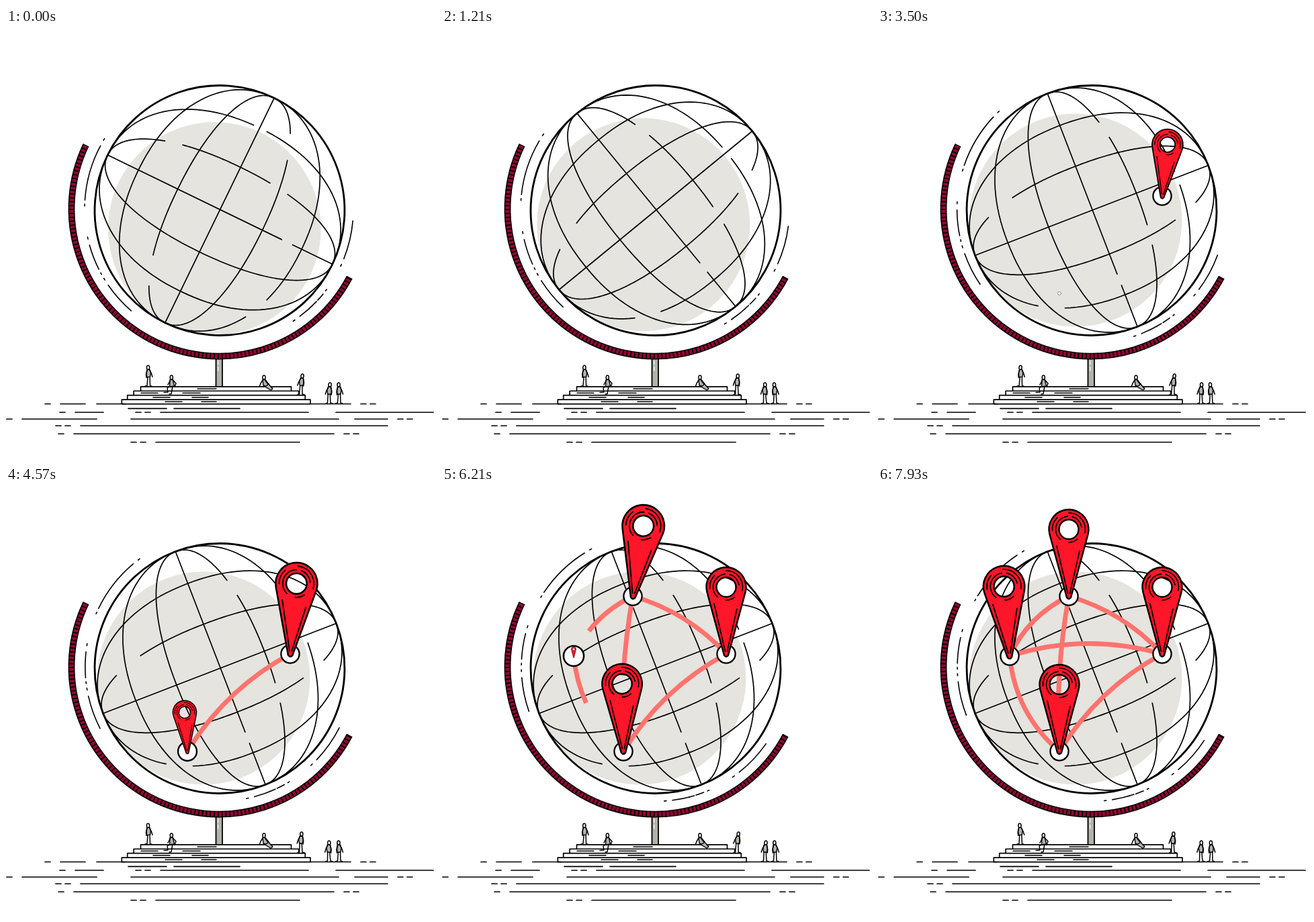
An HTML page with a canvas that plays this animation: 640 px wide and 640 px high, repeating every 8000 ms.

```html
<!DOCTYPE html>
<html lang="en">
<head>
<meta charset="utf-8">
<title>Globe with pins</title>
<style>
html, body { margin: 0; width: 100%; height: 100%; overflow: hidden; background: #fff; }
canvas { display: block; width: 100vw; height: 100vh; }
</style>
</head>
<body>
<canvas id="stage" width="640" height="640"></canvas>
<script>
const ctx = document.getElementById('stage').getContext('2d');
const LOOP = 8000, TAU = Math.PI * 2, R = 186;
const GREY = '#e5e4df', RED = '#ff1628', MAROON = '#900632', SALMON = '#fd736e', CLOTH = '#b0b3ac';
const rad = deg => deg * Math.PI / 180;
const ramp = (t, from, to) => Math.min(1, Math.max(0, (t - from) / (to - from)));
const ease = (t, from, to) => { const u = ramp(t, from, to); return u * u * (3 - 2 * u); };

const pins = [
  { x: 423, y: 250, start: 2290, tilt: 9 },
  { x: 270, y: 395, start: 3500, tilt: -11 },
  { x: 284, y: 164, start: 4700, tilt: 8.3 },
  { x: 196, y: 253, start: 5530, tilt: -11 }
];
const routes = [
  { from: pins[0], to: pins[1], bulge: 0.134, start: 3700 },
  { from: pins[0], to: pins[2], bulge: 0.14, start: 4850 },
  { from: pins[2], to: pins[3], bulge: 0.18, start: 5600 },
  { from: pins[2], to: pins[1], bulge: 0.06, start: 5700 },
  { from: pins[3], to: pins[1], bulge: 0.2, start: 5750 },
  { from: pins[0], to: pins[3], bulge: 0.15, start: 6400 }
];

function place(x, y, angle, scale, draw) {
  ctx.save();
  ctx.translate(x, y);
  ctx.rotate(rad(angle));
  ctx.scale(scale, scale);
  draw();
  ctx.restore();
}
function stroke(width, color = '#000') {
  ctx.lineWidth = width;
  ctx.strokeStyle = color;
  ctx.stroke();
}
function fill(color, rule = 'nonzero') {
  ctx.fillStyle = color;
  ctx.fill(rule);
}
function arc(x, y, r, from, to) {
  ctx.moveTo(x + r * Math.cos(rad(from)), y + r * Math.sin(rad(from)));
  ctx.arc(x, y, r, rad(from), rad(to));
}
function line(x, y, ...rest) {
  ctx.moveTo(x, y);
  for (let i = 0; i < rest.length; i += 2) ctx.lineTo(rest[i], rest[i + 1]);
}
function disc(x, y, r) {
  ctx.beginPath();
  ctx.arc(x, y, r, 0, TAU);
}

// Grid curves are slightly squared ellipses
function gridCurve(rx, ry, from, to) {
  const bend = v => Math.sign(v) * Math.abs(v) ** (2 / 2.15);
  const shift = rx < ry ? 1.3 : 0;
  for (let i = 0; i <= 120; i++) {
    const a = rad(from + (to - from) * i / 120);
    const x = shift + rx * bend(Math.cos(a)), y = ry * bend(Math.sin(a));
    i ? ctx.lineTo(x, y) : ctx.moveTo(x, y);
  }
}

function drawGlobe(t) {
  const inner = 70, outer = 135;
  place(318, 271.5, -64.1 + 43 * ease(t, 0, 2200), 1, () => {
    disc(-27.6, 4.9, 158.5);
    fill(GREY);
    ctx.beginPath();
    gridCurve(inner, R, 24, 322);
    gridCurve(inner, R, -28, 14);
    gridCurve(outer, R, 3, 357.5);
    gridCurve(R, outer, 131, 477);
    gridCurve(R, inner, 55, 219);
    gridCurve(R, inner, 238, 398);
    line(-R, 0, R, 0);
    line(1.3, -R, 1.3, 102);
    line(1.3, 120, 1.3, R);
    stroke(1.7);
    disc(0, 0, R);
    stroke(2.8);
  });
}

function drawOrbit(t) {
  const swing = 31.5 * (ease(t, 0, 7200) - ease(t, 7200, 10800));
  const dash = (from, to) => arc(-1, -2, 200, from, to);
  // A long arc, a dot after it and sometimes one before it
  const comet = (from, to, leading) => {
    dash(from, to);
    dash(to + 2.6, to + 3.5);
    if (leading) dash(from - 2.5, from - 1.7);
  };
  place(318, 271.5, swing, 1, () => {
    ctx.beginPath();
    comet(5, 21.7);
    comet(39.2, 42.7, true);
    comet(43.5, 53);
    comet(130.8, 145.5);
    comet(153.4, 164.5, true);
    comet(183.8, 208.1, true);
    stroke(1.6);
  });
}

function drawStand() {
  ctx.fillStyle = CLOTH;
  ctx.fillRect(312.5, 490, 9.5, 43.5);
  ctx.beginPath();
  line(312.5, 490, 312.5, 533);
  line(322, 490, 322, 533);
  stroke(1.8);
  ctx.beginPath();
  line(315.8, 495, 315.8, 501);
  line(315.8, 504, 315.8, 510);
  stroke(1.2, '#fff');

  const band = (pad, width, color) => {
    ctx.beginPath();
    arc(317, 269, 219.5, 28 - pad, 205.3 + pad);
    stroke(width, color);
  };
  ctx.lineCap = 'butt';
  band(0.3, 9.8, '#000');
  band(0, 6.8, MAROON);
  ctx.setLineDash([1.7, 4.1]);
  band(0, 9, '#000');
  ctx.setLineDash([]);
  ctx.lineCap = 'round';
}

function drawSteps() {
  ctx.beginPath();
  for (let i = 0; i < 4; i++) {
    const left = 200.5 - 10.9 * i + 0.5 * i * i;
    const right = 424.5 + 12.2 * i - 0.9 * i * i;
    ctx.rect(left, 533.8 + 6.45 * i, right - left, 6.45);
  }
  fill('#fff');
  stroke(1.7);
  ctx.beginPath();
  line(285, 537, 313, 537);
  for (let i = 0; i < 3; i++) {
    const y = 543.3 + 6.45 * i;
    line(201 + 18 * i, y, 226 + 18 * i, y);
    line(263 + 14 * i, y, 289 + 12 * i, y);
  }
  stroke(1.6);
}

// A long ground stroke with a number of short dashes past either end
function bar(y, x0, x1, before = 0, after = 0) {
  line(x0, y, x1, y);
  for (let i = 0; i < before; i++) line(x0 - 15 - 14 * i, y, x0 - 23 - 14 * i, y);
  for (let i = 0; i < after; i++) line(x1 + 15 + 14 * i, y, x1 + 23 + 14 * i, y);
}
function drawGround() {
  ctx.beginPath();
  bar(559.5, 135, 177);
  bar(559.5, 81, 118, 1);
  bar(559.5, 453, 513, 0, 2);
  bar(566.3, 182, 239);
  bar(566.3, 250, 348);
  bar(572, 103, 145, 1);
  bar(572, 230, 450, 2);
  bar(572, 491, 636);
  bar(582, 24, 135, 1);
  bar(582, 186, 495);
  bar(582, 519, 568, 0, 2);
  bar(592, 111, 568, 2);
  bar(604, 101, 488, 1, 2);
  bar(616.5, 223, 437, 2);
  stroke(1.7);
}

function body(...points) {
  ctx.beginPath();
  line(...points);
  ctx.closePath();
  fill(CLOTH);
  stroke(1.4);
}
function head(x, y) {
  ctx.beginPath();
  ctx.ellipse(x, y, 2.1, 3.1, 0, 0, TAU);
  fill('#fff');
  stroke(1.5);
}
function limbs(...paths) {
  ctx.beginPath();
  paths.forEach(p => line(...p));
  stroke(1.5);
}
function standing(x, y, lean, flip) {
  ctx.save();
  ctx.translate(x, y);
  ctx.transform(flip, 0, -lean / 28, 1, 0, 0);
  limbs([-1, -14, -2, -1, -5, -0.3], [2, -14, 2.5, -1, 5, -0.3]);
  body(-2, -25, 2, -25, 3.5, -20, 2.5, -14, -2.5, -14, -3, -20);
  limbs([2, -24, 4.5, -19, 6, -14], [-2, -24, -3.5, -18, -3, -13]);
  head(-0.5, -28);
  ctx.restore();
}
function drawPeople(t) {
  const sway = phase => 0.7 * Math.sin(t / 480 + phase);
  standing(212, 533.4, sway(0), 1);
  standing(439, 546, sway(1) + 1, -1);
  standing(481, 559, sway(2), -1);
  standing(495.5, 559, sway(3), 1);

  place(246, 533, 0, 1, () => {
    limbs([-2, 0, -6, 3, -5, 9, -11, 9.5], [2, 0, 0, 11.5, -3, 12]);
    body(-2, -9.5, 2.5, -9.5, 4.5, 0, -2.5, 1);
    limbs([2.5, -9, 7, -4, 5, 1], [-2, -8, -5, -2]);
    head(0.3, -13);
  });
  place(384, 533, 0, 1, () => {
    body(0, 0, 6, -4, 13, 4, 10, 6);
    body(-2, -9.5, 2, -9.5, 7, -3, 3, 0, -1, -1);
    limbs([-2, -9, -5, -4, -6.5, 0], [2, -8, 6, -3]);
    head(0, -13);
  });
}

function drawRoute({ from, to, bulge, start }, t) {
  const u = ease(t, start, start + 1000);
  if (!u) return;
  const mix = (a, b) => a + (b - a) * u;
  const dx = to.x - from.x, dy = to.y - from.y;
  const cx = from.x + dx / 2 - dy * bulge, cy = from.y + dy / 2 + dx * bulge;
  const mx = mix(from.x, cx), my = mix(from.y, cy);
  ctx.lineCap = 'butt';
  ctx.beginPath();
  ctx.moveTo(from.x, from.y);
  ctx.quadraticCurveTo(mx, my, mix(mx, mix(cx, to.x)), mix(my, mix(cy, to.y)));
  stroke(7, SALMON);
  ctx.lineCap = 'round';
}

function drawBase({ x, y, start }, t) {
  const s = t - start;
  const u = ramp(s, -50, 550);
  const size = 1.11 * u * (2 - u) - 0.11 * ease(s, 800, 1200);
  if (size <= 0) return;
  place(x, y, 0, size, () => {
    disc(0, 0, 13.6);
    fill('#fff');
    stroke(2.3);
  });
}

function drawPin({ x, y, start, tilt }, t) {
  const s = t - start;
  const settle = ease(s, 1700, 2950);
  const size = 1.1 * ease(s, 420, 1650) - 0.1 * settle;
  if (size <= 0) return;
  place(x, y + 3, tilt * (ease(s, 790, 1500) - settle), size, () => {
    const ring = (r, from, to) => arc(0, -102.5, r, from, to);
    ctx.beginPath();
    ring(29.5, 165, 375);
    ctx.lineTo(3, -1);
    ctx.quadraticCurveTo(0, 3, -3, -1);
    ctx.closePath();
    ring(14.5, 0, 360);
    fill(RED, 'evenodd');
    stroke(2.4);
    ctx.beginPath();
    line(-18, -78, -1.5, -7);
    line(16, -70, 1.5, -7);
    ring(19.5, 130, 265);
    ring(19.5, 285, 350);
    ring(19.5, 50, 90);
    ring(24.5, 175, 225);
    ring(24.5, 270, 372);
    stroke(1.7);
  });
}

function frame(now) {
  const t = now % LOOP;
  ctx.fillStyle = '#fff';
  ctx.fillRect(0, 0, 640, 640);
  ctx.lineCap = ctx.lineJoin = 'round';
  drawGlobe(t);
  drawOrbit(t);
  drawStand();
  drawSteps();
  drawGround();
  drawPeople(t);
  routes.forEach(route => drawRoute(route, t));
  pins.forEach(pin => drawBase(pin, t));
  pins.forEach(pin => drawPin(pin, t));
}

let origin;
function tick(now) {
  origin ??= now;
  frame(now - origin);
  requestAnimationFrame(tick);
}
frame(0);
requestAnimationFrame(tick);
</script>
</body>
</html>
```
